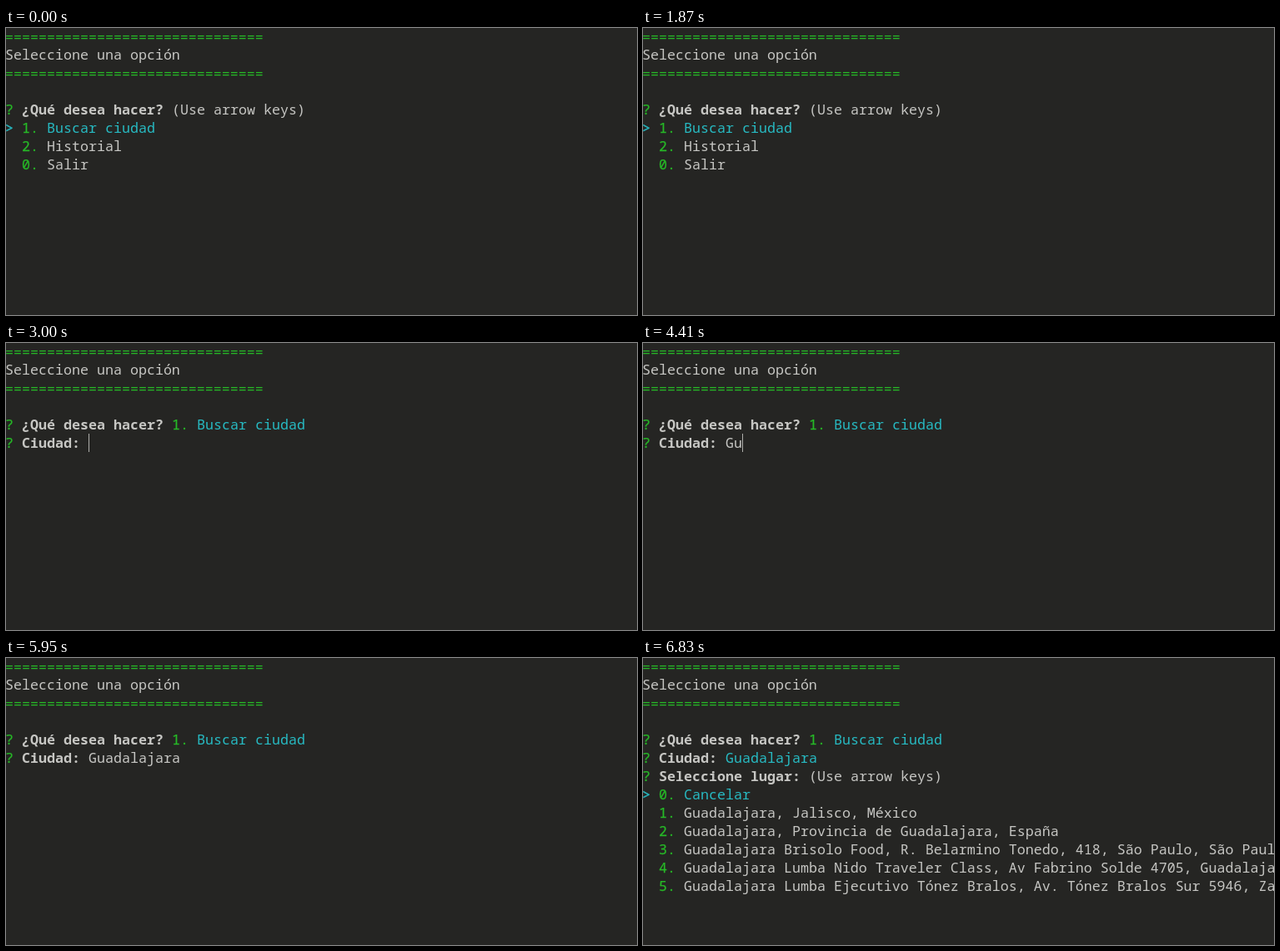
Recreate the animation shown at these times as an HTML page. Size 757x345 px, loop 8 s.

```html
<!DOCTYPE html>
<html lang="es">
<head>
<meta charset="utf-8">
<title>Terminal</title>
<style>
  html, body { margin: 0; width: 100%; height: 100%; overflow: hidden; background: #252523; }
  svg { display: block; width: 757px; height: 345px; }
  text { font: 16.667px "Noto Sans Mono", "DejaVu Sans Mono", monospace; white-space: pre; fill: #c6c6c3; }
  .g { fill: #27b927; stroke: #27b927; stroke-width: .25px; }
  .c { fill: #27bac2; }
  .p { fill: #27bac2; stroke: #27bac2; stroke-width: .4px; }
  .b { font-weight: 700; }
  .rule { fill: #27b927; transform: translateY(1px); }
</style>
</head>
<body>
<svg viewBox="0 0 757 345">
  <rect width="757" height="345" fill="#252523"/>
  <g id="screen"></g>
  <rect id="caret" y="109" width="1" height="22" fill="#aeaeab"/>
  <path id="mouse" d="M-4 -9.5H-1L0 -8.5L1 -9.5H4M0 -8.5V8.5M-4 9.5H-1L0 8.5L1 9.5H4" fill="none" stroke="#d8d8d6"/>
</svg>
<script>
const LOOP = 8000, CELL = 10, LINE = 22;
const MENU_END = 1930, SUBMIT = 6380, RESULTS = 6830;
const CITY = "Guadalajara";
const KEYS = [4100, 4410, 4490, 4570, 4650, 4830, 4960, 5140, 5210, 5330, 5450];
const BLINKS = [2430, 3000, 3530, 4030, 5950];
const MOVES = [190, 250, 310, 380, 440], MOUSE_END = 1870;

const $ = id => document.getElementById(id);
const screen = $("screen"), caret = $("caret"), mouse = $("mouse");
const passed = (times, t) => times.filter(at => at <= t).length;

// A row is a list of [style, text] spans.
const rule = [["rule", "=".repeat(31)]];
const ask = (label, ...rest) => [["g", "? "], ["b", label + " "], ...rest];
const option = (n, label, on) => [["p", on ? "> " : "  "], ["g", n + ". "], [on ? "c" : "", label]];
const hint = ["", "(Use arrow keys)"];
const header = [rule, [["", "Seleccione una opción"]], rule, []];

const menu = [
  ask("¿Qué desea hacer?", hint),
  option(1, "Buscar ciudad", true),
  option(2, "Historial"),
  option(0, "Salir")
];
const places = [
  ask("Seleccione lugar:", hint),
  option(0, "Cancelar", true),
  option(1, "Guadalajara, Jalisco, México"),
  option(2, "Guadalajara, Provincia de Guadalajara, España"),
  option(3, "Guadalajara Brisolo Food, R. Belarmino Tonedo, 418, São Paulo, São Paulo"),
  option(4, "Guadalajara Lumba Nido Traveler Class, Av Fabrino Solde 4705, Guadalajara"),
  option(5, "Guadalajara Lumba Ejecutivo Tónez Bralos, Av. Tónez Bralos Sur 5946, Zapopan")
];

function rowsAt(t) {
  if (t < MENU_END) return [...header, ...menu];
  const typed = CITY.slice(0, passed(KEYS, t));
  const rows = [
    ...header,
    ask("¿Qué desea hacer?", ["g", "1. "], ["c", "Buscar ciudad"]),
    ask("Ciudad:", [t < SUBMIT ? "" : "c", typed])
  ];
  return t < RESULTS ? rows : rows.concat(places);
}

function markup(rows) {
  return rows.map((spans, i) => {
    let col = 0;
    return spans.map(([style, text]) => {
      const x = col * CELL - 1;
      col += text.length;
      return `<text class="${style}" x="${x}" y="${16 + i * LINE}">${text.replace(">", "&gt;")}</text>`;
    }).join("");
  }).join("");
}

let shown = "";
function draw(t) {
  const html = markup(rowsAt(t));
  if (html !== shown) screen.innerHTML = shown = html;

  const lit = passed(BLINKS, t) % 2 === 0;
  caret.style.display = lit && t >= MENU_END && t < SUBMIT ? "" : "none";
  caret.setAttribute("x", 99 + passed(KEYS, t) * CELL);

  const step = passed(MOVES, t);
  mouse.style.display = step && t < MOUSE_END ? "" : "none";
  const left = Math.pow((MOVES.length - step) / (MOVES.length - 1), 1.3);
  mouse.setAttribute("transform", `translate(${Math.round(480 + 151 * left) + 0.5} ${Math.round(250 + 62 * left)})`);
}

const start = performance.now();
function tick() {
  draw((performance.now() - start) % LOOP);
  requestAnimationFrame(tick);
}
tick();
</script>
</body>
</html>
```
